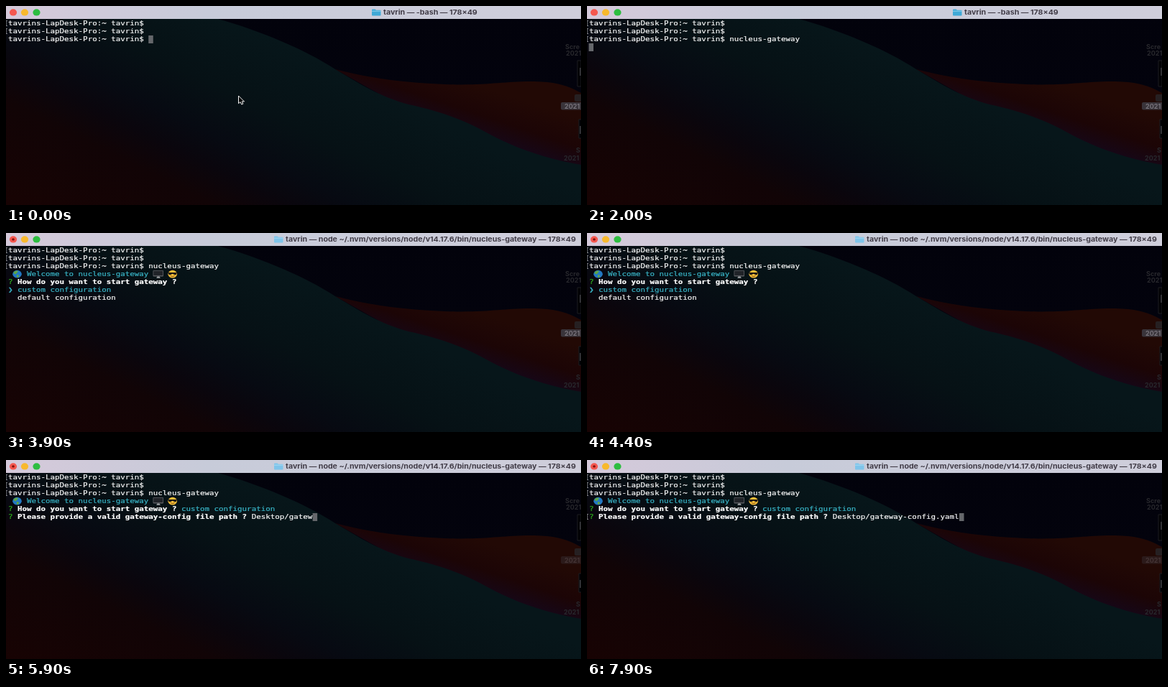
An HTML page that plays this animation: 800x277 px, repeating every 8000 ms.

```html
<!DOCTYPE html>
<html lang="en">
<head>
<meta charset="utf-8">
<title>Terminal session</title>
<style>
  html, body { margin: 0; width: 100%; height: 100%; overflow: hidden; background: #05060d; }
  svg { display: block; }
  text { white-space: pre; }
  .ui { font-family: Inter, sans-serif; font-weight: 700; }
  #term { font: 10.84px "DejaVu Sans Mono", monospace; color: #f4f4f4; }
  #term text, #term tspan { fill: currentColor; stroke: currentColor; stroke-width: .25; }
  .cyan { color: #38b2c4; }
  .green { color: #2fb41e; }
  .bold { font-weight: 700; color: #fff; }
  .mark { color: #a0a0a4; }
</style>
</head>
<body>
<svg width="800" height="277" viewBox="0 0 800 277">
  <defs>
    <linearGradient id="bar"><stop stop-color="#d5c9da"/><stop offset=".35" stop-color="#c7cbd9"/><stop offset="1" stop-color="#cfcedb"/></linearGradient>
    <linearGradient id="sky" x2="0" y2="1"><stop stop-color="#02020b"/><stop offset="1" stop-color="#04040f"/></linearGradient>
    <linearGradient id="hill" gradientUnits="userSpaceOnUse" x1="458" y1="88" x2="288" y2="428"><stop stop-color="#07161a"/><stop offset=".25" stop-color="#061115"/><stop offset=".42" stop-color="#070a12"/><stop offset=".52" stop-color="#0a060d"/><stop offset=".64" stop-color="#110406"/><stop offset="1" stop-color="#180303"/></linearGradient>
    <linearGradient id="ember" gradientUnits="userSpaceOnUse" x1="640" y1="105" x2="610" y2="195"><stop stop-color="#220905"/><stop offset=".4" stop-color="#1c0506"/><stop offset=".7" stop-color="#160717"/><stop offset="1" stop-color="#130819"/></linearGradient>
  </defs>

  <rect width="800" height="277" fill="url(#sky)"/>
  <path d="M458 88C500 99 550 107 610 109S690 105 730 105S785 113 800 121V240L640 190Z" fill="url(#ember)"/>
  <path d="M0 18H295C355 35 415 60 458 88C495 110 520 126 560 137C610 148 640 160 672 178C704 195 745 212 800 221V277H0Z" fill="url(#hill)"/>

  <g class="ui" font-size="9" fill="#28282d">
    <text x="778" y="60">Scre</text>
    <text x="779" y="69">2021</text>
    <path d="M795 76h5v36h-5zM797 158h5v26h-5z" fill="#020205" stroke="#1c1c20"/>
    <path d="M798 86h2v11h-2zM798 167h2v11h-2z" fill="#303034"/>
    <rect x="791" y="123" width="12" height="10" rx="2" fill="#262022"/>
    <g id="label">
      <rect x="772" y="134" width="32" height="10.5" rx="2" fill="#39343a"/>
      <text x="777" y="142.5" fill="#77727a">2021</text>
    </g>
    <text x="793" y="204">S</text>
    <text x="776" y="214.5">2021</text>
  </g>

  <rect width="800" height="18" fill="url(#bar)"/>
  <ellipse cx="10" cy="8.9" rx="5.1" ry="4.6" fill="#f4574f"/>
  <ellipse id="dot" cx="10" cy="8.9" rx="1.9" ry="1.7" fill="#80120f"/>
  <ellipse cx="26" cy="8.9" rx="5.1" ry="4.6" fill="#f8b92d"/>
  <ellipse cx="42.5" cy="8.9" rx="5.1" ry="4.6" fill="#2dbd40"/>
  <g id="heading">
    <path id="folder" d="M0 5.5Q0 4.5 1 4.5H4.5L6 5.7H11.5Q12.5 5.7 12.5 6.7V12.5Q12.5 13.5 11.5 13.5H1Q0 13.5 0 12.5Z"/>
    <path d="M0 7.2H12.5" stroke="#b5e2f5" stroke-width=".7"/>
    <text id="title" class="ui" transform="translate(16 12) scale(1 .87)" font-size="10.63" fill="#413c47"></text>
  </g>

  <rect id="caret" width="6.5" height="11" fill="#65676b"/>
  <!-- the recording is squashed vertically, hence the scale -->
  <g id="term" transform="translate(2.9 18.6) scale(1 .87)"></g>

  <g id="emoji">
    <ellipse cx="15.5" cy="57.2" rx="6.3" ry="5.4" fill="#2379c4"/>
    <path d="M11 54Q14 51.5 17 53L15 56L13 57.5L10.5 56ZM15 58L18.5 59L16.5 62.3L14.8 61Z" fill="#5fa545"/>
    <rect x="204.5" y="52" width="14.5" height="8.5" rx="1" fill="#5c5f63"/>
    <rect x="205.3" y="52.7" width="12.9" height="6.4" fill="#202328"/>
    <path d="M210.5 60.5h3l1.3 2.2h-5.6z" fill="#a4a6a9"/>
    <ellipse cx="231.7" cy="57.2" rx="6.3" ry="5.4" fill="#f5bf38"/>
    <path d="M225.6 55h12.2l-.8 2.8q-2.5 1.4-4.4-.8h-1.8q-2 2.2-4.4.8z" fill="#1c1714"/>
    <path d="M228.8 59.6q3 2 5.8 0" fill="none" stroke="#7b4518" stroke-width=".9"/>
  </g>

  <path id="pointer" d="M323.5 125V135.7L326 133.6L327.8 137L329.8 136.2L328.2 133H331.5Z" fill="#080808" stroke="#f5f5f5"/>
</svg>

<script>
const LOOP = 8000, ADVANCE = 6.525, PITCH = 12.64;
const USER = "tavrin", PROMPT = `${USER}s-LapDesk-Pro:~ ${USER}$ `;
const COMMAND = "nucleus-gateway", PATH = "Desktop/gateway-config.yaml";
const QUESTION = "Please provide a valid gateway-config file path ? ";
const at = {
  type: 300, complete: 700, enter: 800, launch: 1000, node: 2100, menu: 2500,
  down: 2800, up: 3500, chosen: 4500, path: 5400, done: 7700
};

const $ = id => document.getElementById(id);
const show = (id, on) => $(id).style.visibility = on ? "visible" : "hidden";
const span = (style, text) => `<tspan class="${style}">${text}</tspan>`;
const typed = (text, elapsed, step) => text.slice(0, Math.max(0, Math.floor(elapsed / step) + 1));
const ask = text => span("green", "? ") + span("bold", text);

function commandAt(t) {
  if (t < at.type) return "";
  return t < at.complete ? typed("nuc", t - at.type, 100) : COMMAND + " ";
}

function terminal(t) {
  const command = commandAt(t);
  const rows = [PROMPT, PROMPT, PROMPT + command];
  const marked = [0, 1];
  let caret = t < at.launch ? [PROMPT.length + command.length, 2] : [0, 3];

  if (t >= at.enter) marked.push(2);
  if (t >= at.menu) {
    rows.push(span("cyan", "    Welcome to nucleus-gateway"));
    const question = ask("How do you want to start gateway ? ");
    if (t < at.chosen) {
      const selected = t >= at.down && t < at.up ? "default" : "custom";
      const options = ["custom", "default"].map(name => name === selected
        ? span("cyan", `❯ ${name} configuration`) : `  ${name} configuration`);
      rows.push(question, ...options);
      caret = null;
    } else {
      const path = typed(PATH, t - at.path, 40);
      rows.push(question + span("cyan", "custom configuration"), ask(QUESTION) + path);
      caret = [2 + QUESTION.length + path.length, 5];
      if (t >= at.done) marked.push(5);
    }
  }
  return { rows, marked, caret };
}

let last = "";
function draw(t) {
  const { rows, marked, caret } = terminal(t);
  const line = (text, row, x = 0, style = "") =>
    `<text class="${style}" x="${x}" y="${row * PITCH + 10.06}">${text}</text>`;
  const html = rows.map((text, row) => line(text, row)).join("") +
    marked.map(row => line("[", row, -5.8, "mark")).join("");
  if (html !== last) $("term").innerHTML = last = html;

  show("caret", caret);
  if (caret) {
    $("caret").setAttribute("x", 2.5 + caret[0] * ADVANCE);
    $("caret").setAttribute("y", 19 + caret[1] * 11);
  }

  const running = t >= at.node;
  $("title").textContent = USER + (running
    ? " — node ~/.nvm/versions/node/v14.17.6/bin/nucleus-gateway — 178×49"
    : " — -bash — 178×49");
  $("heading").setAttribute("transform", `translate(${running ? 373 : 509})`);
  $("folder").setAttribute("fill", running ? "#7fc4ea" : "#3fa9d6");
  $("label").setAttribute("opacity", t < at.chosen ? 1 : .4);
  show("dot", running);
  show("emoji", t >= at.menu);
  show("pointer", t < at.type);
}

const start = performance.now();
function tick() {
  draw((performance.now() - start) % LOOP);
  requestAnimationFrame(tick);
}
tick();
</script>
</body>
</html>
```
